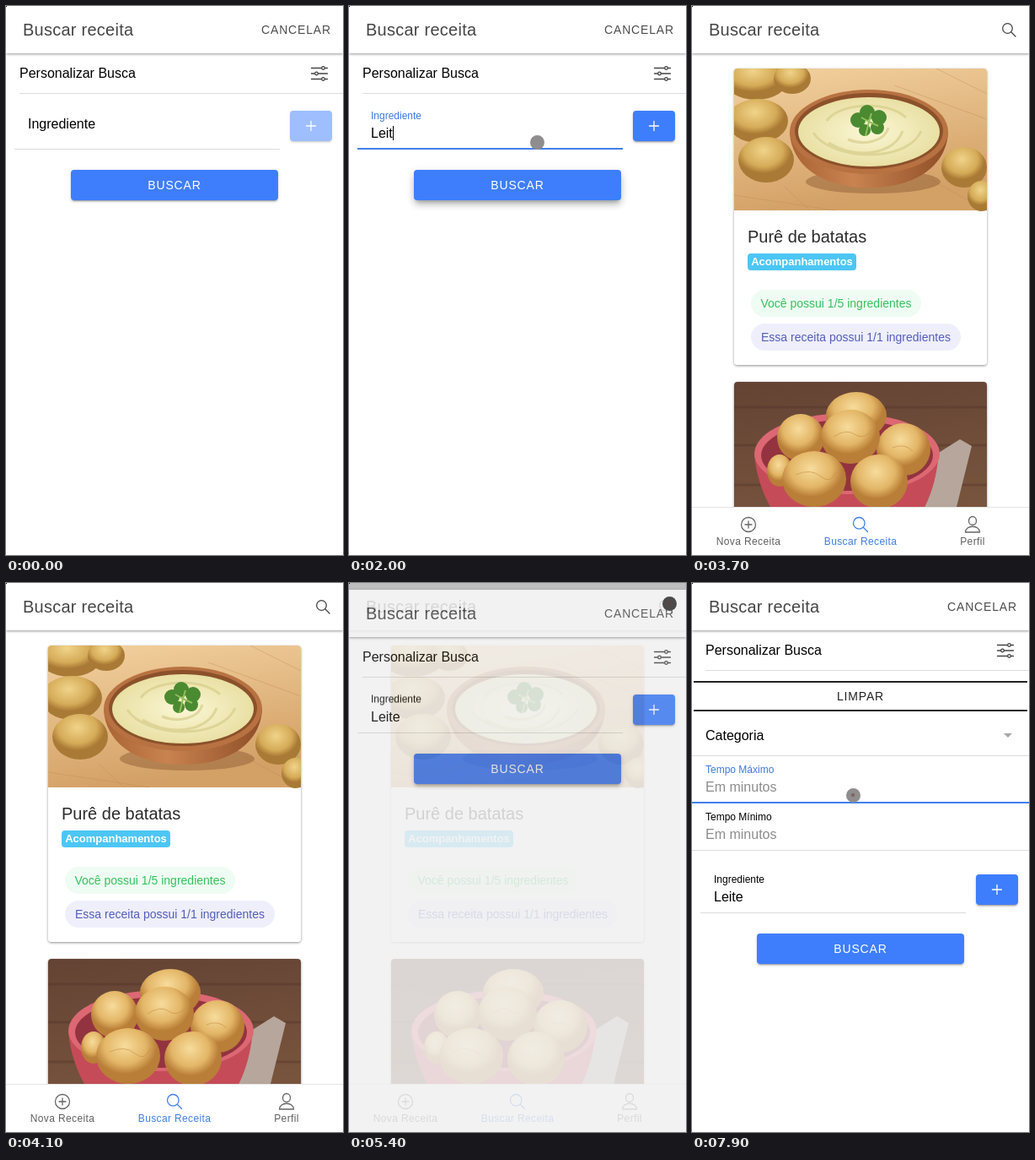
An HTML page that plays this animation: 400 px wide and 650 px high, repeating every 8000 ms.

```html
<!DOCTYPE html>
<html lang="pt-BR">
<head>
<meta charset="utf-8">
<title>Buscar receita</title>
<style>
:root { --blue: #3e7efc; --line: #dcdcdc; }
html, body { margin: 0; width: 100%; height: 100%; overflow: hidden; background: #fff; }
body { font: 16px "Liberation Sans", Arial, sans-serif; color: #000; }
#stage { position: relative; width: 400px; height: 650px; overflow: hidden; background: #fff; }
#stage div, #stage svg, .t { position: absolute; }
#stage svg { overflow: visible; }
.full { inset: 0; }
.t { white-space: pre; line-height: 20px; }
.small { font-size: 12px; }
.grey { color: #8c8c8c; }
.rule { height: 1px; left: 0; right: 0; background: var(--line); }
.head { left: 0; right: 0; top: 0; height: 56px; background: #fff; box-shadow: 0 1px 3px rgba(0,0,0,.42); }
.head .t { left: 20px; top: 18px; font-size: 20px; letter-spacing: .25px; color: #454545; }
.head .cancel { left: 303px; font-size: 14px; letter-spacing: .84px; color: #4c4c4c; }
.icon { fill: none; stroke: #444; stroke-width: 1.3; stroke-linecap: round; stroke-linejoin: round; }
.btn { height: 36px; border-radius: 4px; background: var(--blue); color: #fff; font-size: 14px;
  line-height: 36px; letter-spacing: .84px; text-align: center;
  box-shadow: 0 3px 1px -2px rgba(0,0,0,.2), 0 2px 2px rgba(0,0,0,.14), 0 1px 5px rgba(0,0,0,.12); }

/* results page */
.card { left: 50px; width: 300px; border-radius: 4px; overflow: hidden; background: #fff; }
.cardbox { left: 50px; width: 300px; border-radius: 4px; box-shadow: 0 1px 3px rgba(0,0,0,.45); }
.badge { left: 66px; top: 293px; width: 129px; height: 20px; border-radius: 4px; background: #4cc6f5;
  color: #fff; font: bold 13px/20px "Liberation Sans", Arial, sans-serif; text-align: center; }
.chip { left: 70px; height: 32px; border-radius: 16px; font-size: 14px; line-height: 32px; text-align: center; white-space: nowrap; }
.tabs { left: 0; right: 0; top: 593px; height: 57px; background: #fff; border-top: 1px solid #e4e4e4; box-sizing: border-box; }
.tab { width: 134px; top: 30px; text-align: center; font-size: 12px; line-height: 20px; letter-spacing: .36px; color: #5f5f5f; }

/* timeline: 1% = 80ms */
#back { background: #000; animation: back 8s infinite; }
@keyframes back {
  0%, 43.75% { opacity: .32; }
  46.25%, 66.44% { opacity: 0; animation-timing-function: cubic-bezier(.36,.66,.04,1); }
  69.94%, 100% { opacity: .32; }
}
#modal { background: #fff; animation: modal 8s infinite; }
@keyframes modal {
  0%, 43.75% { opacity: 1; transform: none; animation-timing-function: cubic-bezier(.47,0,.745,.715); }
  46.25%, 66.44% { opacity: 0; transform: translateY(40px); animation-timing-function: cubic-bezier(.36,.66,.04,1); }
  69.94%, 100% { opacity: 1; transform: none; }
}
#sheet { animation: push 8s step-end infinite; }
@keyframes push { 0%, 46.3% { transform: none; } 35.94% { transform: translateY(4px); } }
#bar { left: 0; top: 0; width: 400px; height: 4px; overflow: hidden; background: #d7e5ff; animation: bar 8s step-end infinite; }
@keyframes bar { 0%, 46.3% { opacity: 0; } 35.94% { opacity: 1; } }
#fill { background: var(--blue); transform-origin: left; animation: fill 8s linear infinite; }
@keyframes fill {
  0%, 35.94% { transform: translateX(-54.9%) scaleX(.08); }
  42.19% { transform: translateX(-17.2%) scaleX(.457); }
  48.03%, 100% { transform: translateX(29.5%) scaleX(.727); }
}
#search { left: 77px; top: 194px; width: 246px; animation: press 8s infinite; }
@keyframes press {
  0%, 34% { background: var(--blue); }
  36.5%, 46% { background: #5d92f8; box-shadow: 0 5px 5px -3px rgba(0,0,0,.2), 0 6px 9px rgba(0,0,0,.16), 0 3px 12px rgba(0,0,0,.13); }
  47%, 100% { background: var(--blue); }
}
#label { left: 26px; top: 130px; transform-origin: left; animation: float 8s infinite, hue 8s step-end infinite; }
@keyframes float { 0%, 10.6% { transform: none; } 12.5%, 100% { transform: translateY(-10px) scale(.75); } }
@keyframes hue { 0%, 35% { color: #000; } 10.6% { color: #3f78e0; } }
.focus { height: 2px; background: #3f80ec; }
#f1 { left: 10px; width: 315px; top: 168px; animation: focus1 8s infinite; }
@keyframes focus1 { 0%, 10.6% { opacity: 0; } 12%, 35% { opacity: 1; } 35.2%, 100% { opacity: 0; } }
#f2 { left: 0; width: 400px; top: 259px; animation: focus2 8s step-end infinite; }
@keyframes focus2 { 0% { opacity: 0; } 97.6% { opacity: 1; } }
#max { animation: hue2 8s step-end infinite; }
@keyframes hue2 { 0% { color: #000; } 97.6% { color: #3f78e0; } }
#filters { animation: reveal 8s step-end infinite; }
@keyframes reveal { 0% { opacity: 0; } 77% { opacity: 1; } }
#form { animation: drop 8s step-end infinite; }
@keyframes drop { 0% { transform: none; } 77% { transform: translateY(221px); } }

/* pointer */
#dot { width: 17px; height: 17px; margin: -8.5px; border-radius: 50%; background: #8f8d8d;
  animation: move 8s ease-in-out infinite, show 8s step-end infinite, dim 8s step-end infinite; }
@keyframes move {
  0%, 1.5% { transform: translate(380px, 24px); }
  8.75%, 30% { transform: translate(223px, 161px); }
  33.75%, 57.5% { transform: translate(230px, 211px); }
  64%, 70.5% { transform: translate(380px, 24px); }
  75%, 79% { transform: translate(370px, 79px); }
  83.5%, 91% { transform: translate(251px, 195px); }
  96%, 100% { transform: translate(191px, 251px); }
}
@keyframes show { 0%, 36.9% { opacity: 0; } 1.25%, 57.5% { opacity: 1; } }
@keyframes dim { 0%, 69% { background: #8f8d8d; } 66.2% { background: #4b4b4b; } }
.ring { left: var(--x); top: var(--y); width: 24px; height: 24px; margin: -13px; border: 1px solid #c8322b;
  border-radius: 50%; animation: ring 8s linear infinite; animation-delay: calc(var(--t) - 8s); }
@keyframes ring {
  0% { transform: scale(.05); opacity: 1; }
  6.9% { transform: scale(1); opacity: 1; }
  7.5%, 100% { transform: scale(1); opacity: 0; }
}
.ring.hold { border-width: 3px; width: 20px; height: 20px; animation: hold 8s linear infinite; }
@keyframes hold {
  0%, 76.4% { transform: scale(.05); opacity: 0; }
  76.5% { transform: scale(.05); opacity: 1; }
  79%, 90% { transform: scale(.4); opacity: .9; }
  91%, 100% { transform: scale(.4); opacity: 0; }
}
.ring.last { border-color: #6b2a28; border-width: 6px; width: 14px; height: 14px; animation: last 8s linear infinite; }
@keyframes last {
  0%, 97.4% { transform: scale(.05); opacity: 0; }
  97.5% { transform: scale(.05); opacity: 1; }
  100% { transform: scale(.22); opacity: 1; }
}
#caret { display: inline-block; width: 1px; height: 17px; vertical-align: -3px; background: #000; }
#corner { left: 0; top: 0; width: 1px; height: 1px; background: #000; }
</style>
</head>
<body>
<div id="stage">
  <div class="full">
    <div class="head"><span class="t">Buscar receita</span></div>
    <svg class="icon" width="400" height="56"><circle cx="374.5" cy="26.5" r="5.8"/><path d="M379 31l5 5"/></svg>

    <div class="cardbox" style="top:74px;height:351px"></div>
    <div class="card" style="top:74px;height:351px">
      <svg width="300" height="168" viewBox="0 0 300 168">
        <defs>
          <linearGradient id="wood" x2=".3" y2="1"><stop stop-color="#f3d2a0"/><stop offset="1" stop-color="#d3a066"/></linearGradient>
          <radialGradient id="potato" cx=".45" cy=".3"><stop stop-color="#f0d48a"/><stop offset=".7" stop-color="#d5ab58"/><stop offset="1" stop-color="#a97a35"/></radialGradient>
          <linearGradient id="clay" x2="1"><stop stop-color="#a96334"/><stop offset=".4" stop-color="#c98350"/><stop offset="1" stop-color="#8f4e27"/></linearGradient>
          <radialGradient id="cream"><stop stop-color="#fbf7d6"/><stop offset="1" stop-color="#e9e0a4"/></radialGradient>
        </defs>
        <path fill="url(#wood)" d="M0 0h300v168H0z"/>
        <g fill="none" stroke="#c08a50" stroke-opacity=".4"><path d="M0 150L120 168M190 20L300 60M60 140L90 168M240 0L300 30M230 130L300 168"/></g>
        <g fill="url(#potato)">
          <ellipse cx="26" cy="13" rx="38" ry="24"/><ellipse cx="69" cy="12" rx="22" ry="18"/>
          <ellipse cx="28" cy="62" rx="36" ry="26"/><ellipse cx="38" cy="108" rx="33" ry="27"/>
          <ellipse cx="273" cy="117" rx="27" ry="24"/><ellipse cx="294" cy="151" rx="17" ry="18"/>
        </g>
        <ellipse cx="165" cy="134" rx="80" ry="14" fill="#7d4c26" opacity=".4"/>
        <path fill="url(#clay)" d="M66 76C68 112 100 141 160 141S252 112 254 76z"/>
        <ellipse cx="160" cy="75" rx="94" ry="50" fill="#b87242"/>
        <ellipse cx="160" cy="74" rx="88" ry="45" fill="#8b512b"/>
        <ellipse cx="160" cy="75" rx="84" ry="41" fill="url(#cream)"/>
        <g fill="none" stroke="#d4cb88" stroke-width="3" stroke-opacity=".65"><path d="M94 76c20 32 110 38 128-2M110 62c12-20 70-26 94-4M112 88c34 20 78 14 88-14M135 84c20 8 44 2 48-14"/></g>
        <g fill="#4a8a30"><circle cx="147" cy="61" r="9"/><circle cx="158" cy="52" r="9"/><circle cx="172" cy="58" r="9"/><circle cx="170" cy="70" r="8"/><circle cx="155" cy="73" r="7"/></g>
        <path d="M160 63l-9-5M160 63l3-10M160 63l11 5M160 63l-4 17" stroke="#92bf5a" stroke-width="2"/>
      </svg>
    </div>
    <span class="t" style="left:66px;top:263px;font-size:20px;color:#2b2b2b">Purê de batatas</span>
    <div class="badge">Acompanhamentos</div>
    <div class="chip" style="top:336px;width:202px;background:#effcf3;color:#35c25d">Você possui 1/5 ingredientes</div>
    <div class="chip" style="top:376px;width:249px;background:#efeffc;color:#535dbb">Essa receita possui 1/1 ingredientes</div>

    <div class="cardbox" style="top:445px;height:200px"></div>
    <div class="card" style="top:445px;height:200px">
      <svg width="300" height="200" viewBox="0 0 300 200">
        <defs>
          <linearGradient id="table" y2="1" x2=".2"><stop stop-color="#644334"/><stop offset="1" stop-color="#7b573f"/></linearGradient>
          <radialGradient id="bun" cx=".45" cy=".32"><stop stop-color="#f7dc9c"/><stop offset=".65" stop-color="#e3b667"/><stop offset="1" stop-color="#b97e38"/></radialGradient>
        </defs>
        <path fill="url(#table)" d="M0 0h300v200H0z"/>
        <path d="M0 30H300M0 75H300M0 122H300" stroke="#4b3025" stroke-opacity=".35" stroke-width="3"/>
        <path fill="#b7a69b" d="M225 95L268 68L282 76L264 148H215z"/>
        <path fill="#c64b58" d="M24 86C28 135 55 170 75 190H195C222 165 240 130 243 82z"/>
        <ellipse cx="134" cy="85" rx="110" ry="48" fill="#dc6873"/>
        <ellipse cx="134" cy="87" rx="102" ry="42" fill="#93333f"/>
        <g fill="url(#bun)">
          <ellipse cx="54" cy="105" rx="15" ry="19"/><ellipse cx="145" cy="40" rx="36" ry="28"/>
          <ellipse cx="79" cy="66" rx="28" ry="28"/><ellipse cx="201" cy="80" rx="32" ry="31"/>
          <ellipse cx="138" cy="65" rx="35" ry="32"/><ellipse cx="95" cy="115" rx="38" ry="33"/>
          <ellipse cx="172" cy="118" rx="34" ry="32"/>
        </g>
        <path fill="none" stroke="#c58d43" stroke-opacity=".6" d="M118 65q15-10 25-3t20-4M73 110q18-8 30 2t18-6M188 78q14-6 24 4"/>
      </svg>
    </div>

    <div class="tabs">
      <svg class="icon" width="400" height="40" style="stroke:#666">
        <circle cx="67" cy="20" r="8.5"/><path d="M67 16v8M63 20h8"/>
        <g stroke="#3f7ee6"><circle cx="198.300" cy="18.300" r="6.800"/><path d="M203.500 23.500l5 5"/></g>
        <ellipse cx="333" cy="15.500" rx="4.500" ry="5"/><path d="M324.500 29c0-9 17-9 17 0z"/>
      </svg>
      <div class="tab" style="left:0">Nova Receita</div>
      <div class="tab" style="left:133px;color:#3f7ee6">Buscar Receita</div>
      <div class="tab" style="left:266px">Perfil</div>
    </div>
  </div>

  <div id="back" class="full"></div>
  <div id="modal" class="full">
    <div id="sheet" class="full">
      <div class="head"><span class="t">Buscar receita</span><span class="t cancel">CANCELAR</span></div>
      <span class="t" style="left:16px;top:70px">Personalizar Busca</span>
      <svg class="icon" width="400" height="104">
        <path d="M362.500 73.500h12M378.500 73.500h3M362.500 80h4M370.500 80h11M362.500 86.500h12M378.500 86.500h3"/>
        <circle cx="376.500" cy="73.500" r="1.800"/><circle cx="368.500" cy="80" r="1.800"/><circle cx="376.500" cy="86.500" r="1.800"/>
      </svg>
      <div class="rule" style="left:16px;top:103px"></div>

      <div id="filters" class="full">
        <div style="left:2px;top:116px;width:396px;height:32px;border:solid #222;border-width:2px 0;font-size:14px;line-height:32px;letter-spacing:.84px;text-align:center;color:#222">LIMPAR</div>
        <span class="t" style="left:16px;top:171px">Categoria</span>
        <svg width="400" height="200"><path d="M370 178h10l-5 5z" fill="#a6a6a6"/></svg>
        <div class="rule" style="top:204px"></div>
        <span id="max" class="t small" style="left:16px;top:211px">Tempo Máximo</span>
        <span class="t grey" style="left:16px;top:232px">Em minutos</span>
        <div class="rule" style="top:260px"></div>
        <div id="f2" class="focus"></div>
        <span class="t small" style="left:16px;top:267px">Tempo Mínimo</span>
        <span class="t grey" style="left:16px;top:288px">Em minutos</span>
        <div class="rule" style="top:316px"></div>
      </div>

      <div id="form" class="full">
        <div id="label" class="t">Ingrediente</div>
        <div class="t" style="left:26px;top:141px"><span id="text"></span><span id="caret"></span></div>
        <div class="rule" style="left:10px;right:75px;top:169px"></div>
        <div id="f1" class="focus"></div>
        <div id="plus" class="btn" style="left:337px;top:124px;width:50px">
          <svg class="icon" style="left:0;top:0;stroke:#fff" width="50" height="36"><path d="M25 12.500v11M19.500 18h11"/></svg>
        </div>
        <div id="search" class="btn">BUSCAR</div>
      </div>
    </div>
    <div id="bar"><div id="fill" class="full"></div></div>
  </div>

  <div id="dot"></div>
  <div class="ring" style="--x:223px;--y:161px;--t:800ms"></div>
  <div class="ring" style="--x:230px;--y:211px;--t:2850ms"></div>
  <div class="ring" style="--x:380px;--y:24px;--t:5300ms"></div>
  <div class="ring hold" style="--x:369px;--y:79px"></div>
  <div class="ring last" style="--x:191px;--y:251px"></div>
  <div id="corner"></div>
</div>
<script>
const $ = id => document.getElementById(id);
const word = 'Leite', keys = [1300, 1550, 1750, 1950, 2200];
const focusAt = 850, blurAt = 2800;
const clock = $('dot').getAnimations()[0];

// Typing follows the same clock as the CSS animations.
function draw() {
  const t = (clock.currentTime || 0) % 8000;
  const typed = keys.filter(k => k <= t).length;
  const since = t - (typed ? keys[typed - 1] : focusAt);
  $('text').textContent = word.slice(0, typed);
  $('caret').style.opacity = t >= focusAt && t < blurAt && since % 1000 < 500 ? 1 : 0;
  $('plus').style.opacity = typed ? 1 : .5;
  requestAnimationFrame(draw);
}
draw();
</script>
</body>
</html>
```
